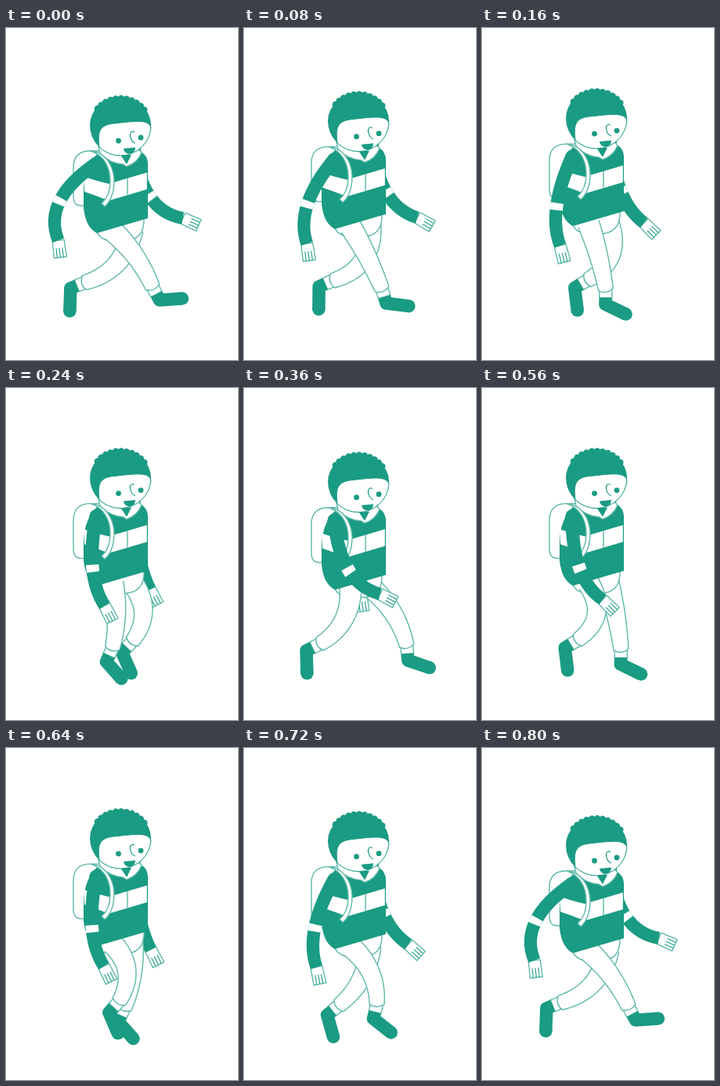
These frames come from a looping animation (296 px wide and 424 px high, 840 ms). An HTML page with a canvas:

```html
<!DOCTYPE html>
<html lang="en">
<head>
<meta charset="utf-8">
<title>Walk cycle</title>
<style>
html, body { margin: 0; width: 100%; height: 100%; overflow: hidden; background: #fff; }
canvas { display: block; width: 296px; height: 424px; }
</style>
</head>
<body>
<canvas id="stage"></canvas>
<script>
const W = 296, H = 424, STEP = 40, STEPS = 21, CYCLE = 20, HALF = CYCLE / 2;
const GREEN = '#1a9b83', LINE = '#5fb9aa', WHITE = '#fff';

const canvas = document.getElementById('stage');
const ctx = canvas.getContext('2d');
const ratio = window.devicePixelRatio || 1;
canvas.width = W * ratio;
canvas.height = H * ratio;

const lerp = (a, b, u) => a + (b - a) * u;
const mix = (p, q, u) => [lerp(p[0], q[0], u), lerp(p[1], q[1], u)];
const wave = (phase, peak) => Math.cos((phase - peak) / CYCLE * 2 * Math.PI);
const glide = (u, power) => Math.min(1, (1.08 * u) ** power);

// Point at a distance from p; 0 degrees is straight down, positive is forward.
function reach(p, length, degrees) {
  const a = degrees * Math.PI / 180;
  return [p[0] + length * Math.sin(a), p[1] + length * Math.cos(a)];
}

function paint(path, fill, stroke, width = 1.4) {
  if (fill) { ctx.fillStyle = fill; ctx.fill(path); }
  if (stroke) { ctx.strokeStyle = stroke; ctx.lineWidth = width; ctx.stroke(path); }
}
const shape = (d, fill, stroke, width) => paint(new Path2D(d), fill, stroke, width);

function dot(x, y, r) {
  const path = new Path2D();
  path.arc(x, y, r, 0, 7);
  paint(path, GREEN);
}

// Point and unit normal on a curve from a to b that passes through mid.
function along(a, mid, b, u) {
  const c = [0, 1].map(k => 2 * mid[k] - (a[k] + b[k]) / 2);
  const p = mix(a, c, u), q = mix(c, b, u), len = Math.hypot(q[0] - p[0], q[1] - p[1]) || 1;
  const at = mix(p, q, u);
  return { x: at[0], y: at[1], nx: (p[1] - q[1]) / len, ny: (q[0] - p[0]) / len };
}

// Tapered tube between u0 and u1, open at its start.
function tube(a, mid, b, w0, w1, bulge = 0, u0 = 0, u1 = 1) {
  const left = [], right = [];
  for (let i = 0; i <= 16; i++) {
    const u = lerp(u0, u1, i / 16), s = along(a, mid, b, u), w = lerp(w0, w1, u) / 2;
    left.push([s.x + s.nx * w, s.y + s.ny * w]);
    right.unshift([s.x - s.nx * w, s.y - s.ny * w]);
  }
  const end = along(a, mid, b, u1), path = new Path2D();
  left.forEach(p => path.lineTo(...p));
  path.quadraticCurveTo(end.x + end.ny * bulge, end.y - end.nx * bulge, ...right[0]);
  right.forEach(p => path.lineTo(...p));
  return path;
}

const straight = (a, b, w0, w1) => tube(a, mix(a, b, 0.5), b, w0, w1);

// The foot travels from front to back in the first half and returns in the second.
function leg(hip, phase, front, back) {
  const stance = phase < HALF, u = phase % HALF / HALF, g = glide(u, 1.4);
  const ankle = [
    stance ? lerp(front, back, g) : lerp(back, front, g),
    328 + 6 * wave(phase, 3.5)];
  const pitch = stance ? lerp(-4, 92, g) : lerp(92, -4, u ** 2.6);
  const s = along(hip, mix(hip, ankle, 0.5), ankle, 0.5);
  const bend = 9.5 + 8 * wave(phase, 13);
  const knee = [s.x - s.nx * bend, s.y - s.ny * bend];
  const heel = reach(ankle, 19, 24 - pitch);
  const toe = reach(heel, 29, 90 - pitch);
  const cuff = mix(ankle, heel, 0.55);

  paint(straight(ankle, cuff, 16, 16), WHITE, LINE);
  const shoe = new Path2D();
  [cuff, heel, toe].forEach(p => shoe.lineTo(...p));
  ctx.lineJoin = 'round';
  paint(shoe, null, GREEN, 16.5);
  dot(...toe, 8.25);
  paint(tube(hip, knee, ankle, 28, 19, 7), WHITE, LINE);
}

function hand(wrist, tip) {
  const palm = straight(wrist, tip, 15, 16);
  palm.closePath();
  paint(palm, WHITE, LINE);
  const s = along(wrist, mix(wrist, tip, 0.5), tip, 0.45);
  const fingers = new Path2D();
  for (const off of [-4, 0, 4]) {
    fingers.moveTo(s.x + s.nx * off, s.y + s.ny * off);
    fingers.lineTo(tip[0] + s.nx * off, tip[1] + s.ny * off);
  }
  paint(fingers, null, GREEN, 1.1);
}

// The arm swings forward evenly and falls back with acceleration.
function arm(shoulder, phase, backAngle) {
  const u = phase % HALF / HALF;
  const swing = phase < HALF ? glide(u, 1) : 1 - u * u;
  const forearm = lerp(-2, 57, swing ** 2.5);
  const elbow = reach(shoulder, 67, lerp(backAngle, 18, swing));
  const wrist = reach(elbow, 50, forearm);
  hand(wrist, reach(wrist, 22, forearm + 9));
  dot(...shoulder, 8.5);
  paint(tube(shoulder, elbow, wrist, 17, 16), GREEN);
  paint(tube(shoulder, elbow, wrist, 17, 16, 0, 0.46, 0.54), WHITE);
}

function shifted(dy, draw) {
  ctx.save();
  ctx.translate(0, dy);
  draw();
  ctx.restore();
}

function backpack() {
  shape('M103 227 H96 Q86 227 86 215 V178 Q86 157 108 157 H120 V227Z', WHITE, LINE);
}

function pelvis() {
  shape('M115 258 C118 268 126 271 134 272 L148 272 C168 272 177 263 176 241', WHITE, LINE);
}

function torso() {
  shape('M119 159 C107 168 99 185 99 207 V230 C101 248 107 257 116 262 L181 243 V174 Q181 163 172 158Z', GREEN);
  shape('M99.5 190 Q114 195 131 199 L180 184.5 V206 L131 220.5 Q115 214 100 209Z', WHITE);
  shape('M155 192 V213 M180.3 172 V243', null, GREEN, 1);
  shape('M118 151 L120 160 Q132 173 149 174 L154 177 Q168 172 173 159 L165 150Z', WHITE, LINE);
  shape('M146 162 H160 L154 174Z', GREEN);
}

function strap() {
  shape('M108 157 C126 158 137 175 138 194 C138 210 134 221 126 228 L122 224 C130 217 133 208 133 196 C133 179 126 163 108 157Z', WHITE, LINE);
}

function head() {
  const hair = new Path2D();
  hair.ellipse(146, 124, 39, 35, 0, Math.PI, 0);
  hair.arc(146, 124, 39, 0, Math.PI);
  paint(hair, GREEN);
  for (let i = 0; i < 11; i++) {
    const a = (-142 + i * 10.7) * Math.PI / 180;
    dot(146 + 37 * Math.cos(a), 124 + 34 * Math.sin(a), 4.2);
  }
  const face = new Path2D('M185 128 C183 116 165 119 137 122 C118 124 117 134 119 152');
  face.arc(146, 124, 39, 2.34, 0.1, true);
  paint(face, WHITE, GREEN, 1);
  dot(143.5, 144, 3.4);
  dot(172, 140, 3.4);
  shape('M164 133 C160 130 157 135 159 140 C160 144 162 146 165 147', null, GREEN, 1.1);
  shape('M150 154 L165 152.5 C165 163 151 163 150 154Z', GREEN);
}

function draw(phase) {
  const opposite = (phase + HALF) % CYCLE;
  const bob = -8.8 * Math.sin(phase % HALF / HALF * Math.PI) - 0.8 * (1 - wave(phase, 0));
  ctx.setTransform(ratio, 0, 0, ratio, 0, 0);
  ctx.fillStyle = WHITE;
  ctx.fillRect(0, 0, W, H);
  shifted(bob, backpack);
  arm([163, 152 + bob], opposite, -18);
  leg([161, 258 + bob], opposite, 212, 100);
  shifted(bob, pelvis);
  leg([136, 259 + bob], phase, 187, 93);
  shifted(bob, () => { torso(); strap(); });
  arm([115, 173 + bob], phase, -44);
  shifted(bob, head);
}

function tick() {
  const step = Math.floor(performance.now() / STEP) % STEPS;
  draw(step % CYCLE);
  requestAnimationFrame(tick);
}
tick();
</script>
</body>
</html>
```
